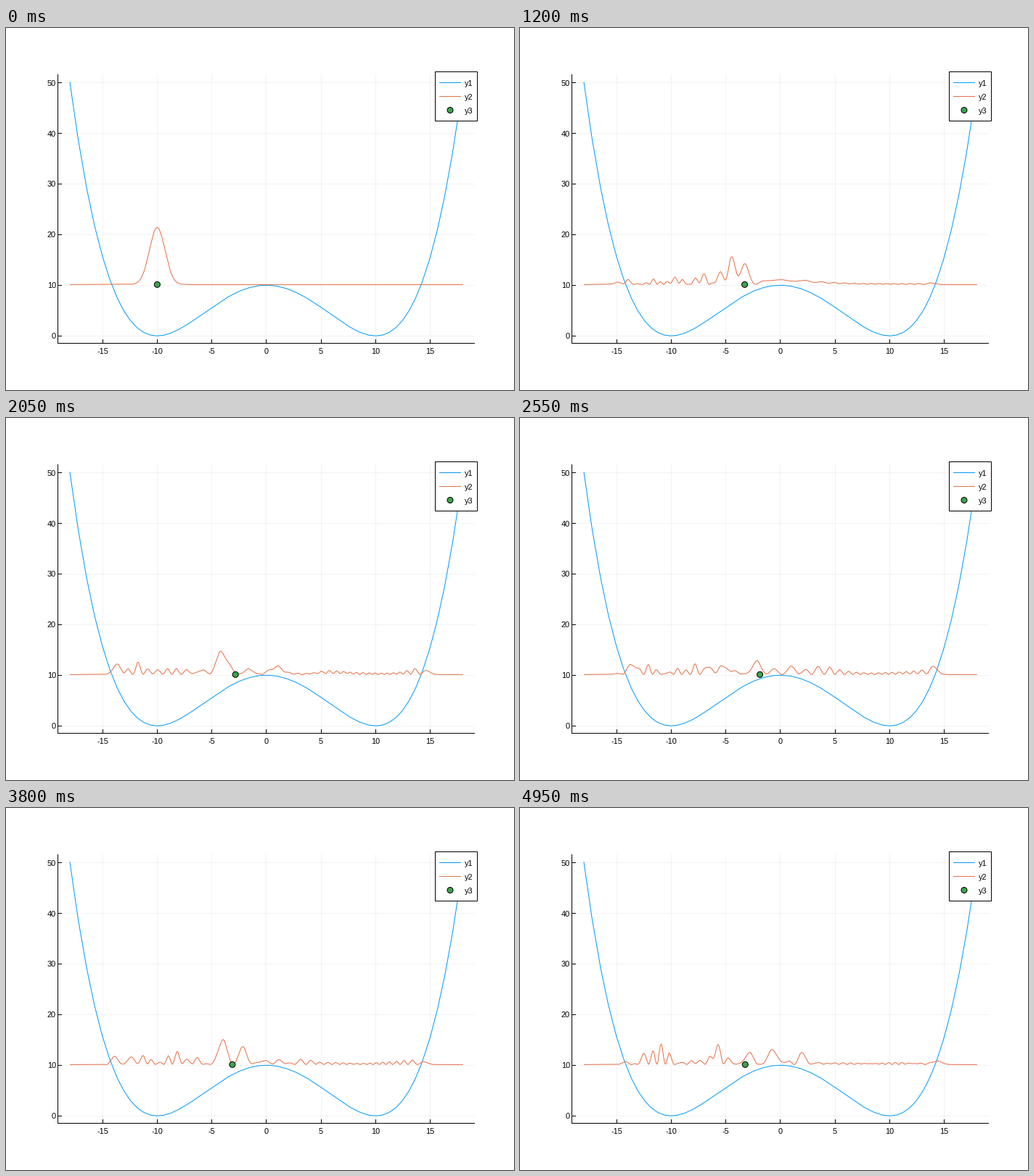
A matplotlib script that plays this animation: 700x500 px, repeating every 5 s.

```python
"""A quantum wave packet in a double well: potential, probability density, mean position."""
import numpy as np
import matplotlib.pyplot as plt
from matplotlib.animation import FuncAnimation
from matplotlib.patches import Circle, Rectangle

plt.rcParams["font.family"] = "Liberation Sans"
plt.rcParams["path.simplify"] = False
plt.rcParams["path.snap"] = False

W, H, DPI = 700, 500, 100
PX = 72 / DPI                      # one pixel in points
FRAMES, INTERVAL = 100, 50
BLUE, ORANGE, GREEN = "#009afa", "#e36f47", "#3ea44e"
LEFT, RIGHT, TOP, BOTTOM = 71.71, 646.06, 63.9, 435.7

# Physics (hbar = m = 1)
N, DX = 361, 0.1
X0, P0, SCALE = -10, 4.4, 20
times = np.linspace(0, 50, FRAMES)
x = np.linspace(-18, 18, N)
V = (x**2 - 100) ** 2 / 1000
k = 2 * np.pi * np.fft.fftfreq(N, DX)
kinetic = np.fft.ifft(k[:, None] ** 2 / 2 * np.fft.fft(np.eye(N), axis=0), axis=0).real
hamilton = kinetic + np.diag(V)
energies, states = np.linalg.eigh((hamilton + hamilton.T) / 2)
psi0 = np.pi**-0.25 * np.exp(-((x - X0) ** 2) / 2 + 1j * P0 * x)
weights = states.T @ psi0
mean_energy = np.sum(np.abs(weights) ** 2 * energies) * DX


def density(t):
    return np.abs(states @ (weights * np.exp(-1j * energies * t))) ** 2


# Data to pixels, with 3% padding on each side
def padded(values):
    pad = 0.03 * np.ptp(values)
    return values.min() - pad, values.max() + pad


X_LIM, Y_LIM = padded(x), padded(V)


def px(value):
    return LEFT + (value - X_LIM[0]) / (X_LIM[1] - X_LIM[0]) * (RIGHT - LEFT)


def py(value):
    return BOTTOM - (value - Y_LIM[0]) / (Y_LIM[1] - Y_LIM[0]) * (BOTTOM - TOP)


def decimate(xs, ys, tol=0.75):
    """Merge runs of points that stay within tol pixels of one straight line."""
    pts = list(zip(xs, ys))
    out, start, i = [pts[0]], pts[0], 1
    while i < len(pts):
        end = high = pts[i]
        dist = np.hypot(high[0] - start[0], high[1] - start[1])
        i += 1
        if dist < 0.2 * tol:
            continue
        ux, uy = (high[0] - start[0]) / dist, (high[1] - start[1]) / dist
        low_dev = high_dev = 0
        while i < len(pts):
            dx, dy = pts[i][0] - start[0], pts[i][1] - start[1]
            dev = dx * uy - dy * ux
            low_dev, high_dev = min(low_dev, dev), max(high_dev, dev)
            if high_dev - low_dev > tol:
                break
            end = pts[i]
            along = dx * ux + dy * uy
            if along > dist:
                dist, high = along, end
            i += 1
        if high is not end:
            out.append(high)
        out.append(end)
        if i < len(pts):
            start = pts[i]
            out.append(start)
            i += 1
    return np.array(out).T


fig = plt.figure(figsize=(W / DPI, H / DPI), dpi=DPI, facecolor="white")
ax = fig.add_axes([0, 0, 1, 1])
ax.set_xlim(0, W)
ax.set_ylim(H, 0)
ax.axis("off")


def line(xs, ys, color, z):
    return ax.plot(xs, ys, color=color, lw=PX, zorder=z,
                   solid_capstyle="butt", solid_joinstyle="miter")[0]


def label(cx, base, text, ha, z=2):
    ax.text(cx, base, text, fontsize=11 * PX, ha=ha, va="baseline", color="black", zorder=z)


def dot(cx, cy, z):
    return ax.add_patch(Circle((cx, cy), 4, fc=GREEN, ec="black", lw=PX, zorder=z))


def crisp(value):
    return np.floor(value) + 0.5


# Grid, ticks and axis lines
for value in range(-15, 16, 5):
    cx = crisp(px(value))
    line([cx, cx], [64, 435], "#f2f2f2", 0)
    line([cx, cx], [430, 435], "black", 1)
    label(px(value), 450, str(value), "center")
for value in range(0, 51, 10):
    cy = crisp(py(value))
    line([72, 646], [cy, cy], "#f2f2f2", 0)
    line([72, 77], [cy, cy], "black", 1)
    label(69, py(value) + 4, str(value), "right")
line([71.5, 71.5], [64, 436], "black", 1)
line([71, 646], [435.5, 435.5], "black", 1)

# Curves and mean position
line(*decimate(px(x), py(V)), BLUE, 3)
wave = line([], [], ORANGE, 4)
mean_dot = dot(0, 0, 5)

# Legend
ax.add_patch(Rectangle((591.5, 60.5), 58, 68, fc="white", ec="black", lw=PX, zorder=6))
line([597, 627], [75.5, 75.5], BLUE, 7)
line([597, 627], [94.5, 94.5], ORANGE, 7)
dot(612, 113.5, 7)
for row in range(3):
    label(632, 80 + 19 * row, f"y{row + 1}", "left", 7)


def update(frame):
    rho = density(times[frame])
    wave.set_data(*decimate(px(x), py(mean_energy + SCALE * rho)))
    mean_dot.center = px(np.sum(x * rho) * DX), py(mean_energy)
    return wave, mean_dot


anim = FuncAnimation(fig, update, frames=FRAMES, interval=INTERVAL, repeat=True, repeat_delay=0)
plt.show()
```
